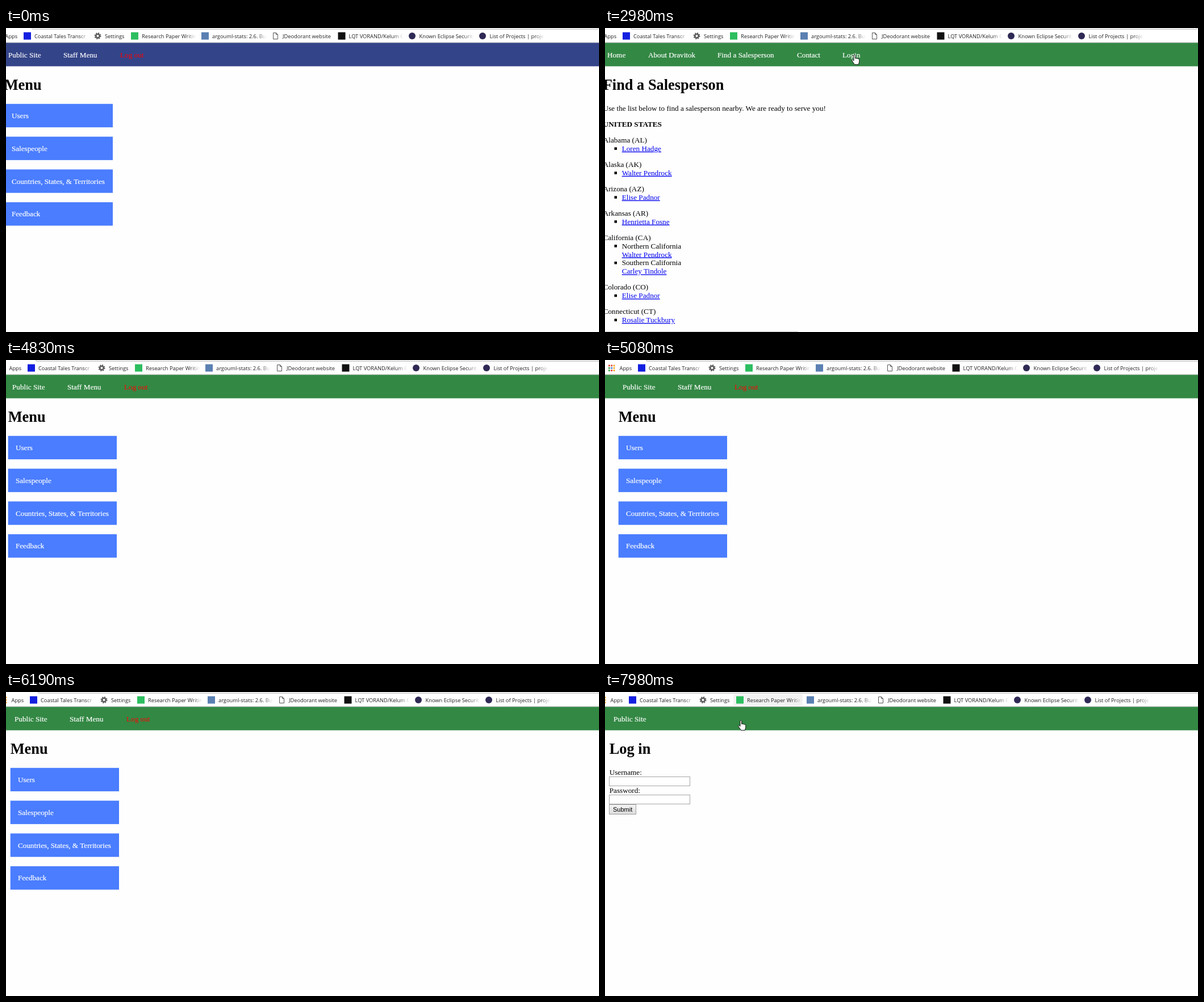
Write an HTML page that moves like this. It is 1044 by 536 pixels and loops after 8000 ms.

```html
<!DOCTYPE html>
<html lang="en">
<head>
<meta charset="utf-8">
<title>Staff menu</title>
<style>
  html, body { margin: 0; width: 100%; height: 100%; overflow: hidden; background: #fefefe; }
  svg { display: block; }
  text { font: 13.2px "Liberation Serif", "Times New Roman", serif; white-space: pre; }
  .h1 { font-size: 26.4px; font-weight: bold; }
  .b { font-weight: bold; }
  .w { fill: #fff; stroke: #fff; stroke-width: .2; }
  .red { fill: #f00; }
  .link { fill: #00e; text-decoration: underline; }
  .mark { font: 9.3px "Open Sans", sans-serif; fill: #222; }
  .fade { fill: url(#fade); }
  .btn { font: 11px "Liberation Sans", Arial, sans-serif; }
</style>
</head>
<body>
<svg id="stage" width="1044" height="536" viewBox="0 0 1044 536"></svg>
<script>
const text = (x, y, str, cls = '') =>
  `<text x="${x}" y="${y}" class="${cls}">${str.replace(/&/g, '&amp;')}</text>`;
const rect = (x, y, w, h, fill, more = '') =>
  `<rect x="${x}" y="${y}" width="${w}" height="${h}" fill="${fill}" ${more}/>`;
const group = (id, body) => `<g id="${id}">${body}</g>`;

// Bookmark bar
const square = color => x => rect(x, 7.5, 13, 13, color);
const disc = x => `<circle cx="${x + 6.5}" cy="14" r="6" fill="#2f2a55"/>`;
const gear = x => `<g fill="none" stroke="#5c5c5c" transform="translate(${x + 6.5} 14)">
  <circle r="3.3" stroke-width="2.6"/><circle r="5" stroke-width="2" stroke-dasharray="2 1.93"/></g>`;
const sheet = x => `<path d="M${x + 2.5} 8.5h5l3 3v8h-8zM${x + 7.5} 8.5v3h3" fill="#fff" stroke="#555"/>`;

const bookmarks = [
  [50, 'Coastal Tales Transcr', square('#1420e0')],
  [174, 'Settings', gear],
  [239, 'Research Paper Writing', square('#2dbe60')],
  [363, 'argouml-stats: 2.6. Build', square('#5b80b2')],
  [487, 'JDeodorant website', sheet],
  [603.5, 'LQT VORAND/Kelum Comp', square('#111')],
  [727.5, 'Known Eclipse Security', disc],
  [851.5, 'List of Projects | projects', disc]
];
const bookmark = ([x, label, icon]) => `<g transform="translate(${x})">${icon(-19)}` +
  text(0, 17.5, label, /^(Set|JDe)/.test(label) ? 'mark' : 'mark fade') + '</g>';

const dotColors = ['#e0402f', '#e0402f', '#f2a31b', '#3a9e4d', '#3f7de0', '#f2a31b', '#3a9e4d', '#e0402f', '#f2a31b'];
const dots = dotColors.map((c, i) => rect(-21 + i % 3 * 4.3, 8.5 + (i / 3 | 0) * 4.3, 2.8, 2.8, c)).join('');

const bar = rect(-60, -20, 1200, 45.3, '#fff') +
  '<path d="M45.5-6V0q0 2 2 2H1041q2 0 2-2V-6" fill="none" stroke="#aaa"/>' +
  group('hoverStats', rect(339, 4, 123, 20, '#e6e6e6', 'rx="2"')) +
  group('hoverPaper', rect(215, 4, 122, 20, '#f2f2f2', 'rx="2"')) +
  dots + text(-1.5, 17.5, 'Apps', 'mark') + bookmarks.map(bookmark).join('') +
  rect(-60, 25.3, 1200, .9, '#b6b4b6');

// Pages
const LEFT = -3.3, LINE = 14.87, GAP = 13.2;
const nav = items => items.map(([x, s, cls = 'w']) => text(x, 52, s, cls)).join('');
const title = s => text(LEFT, 109, s, 'h1');

const menu = nav([[4, 'Public Site'], [101, 'Staff Menu'], [201, 'Log out', 'red']]) + title('Menu') +
  ['Users', 'Salespeople', 'Countries, States, & Territories', 'Feedback'].map((s, i) =>
    rect(LEFT, 133.8 + 57.8 * i, 191.3, 41.3, '#4a7dff') + text(9.9, 159 + 57.8 * i, s, 'w')).join('');

const states = [
  ['Alabama (AL)', '*Loren Hadge'],
  ['Alaska (AK)', '*Walter Pendrock'],
  ['Arizona (AZ)', '*Elise Padnor'],
  ['Arkansas (AR)', '*Henrietta Fosne'],
  ['California (CA)', 'Northern California', '>Walter Pendrock', 'Southern California', '>Carley Tindole'],
  ['Colorado (CO)', '*Elise Padnor'],
  ['Connecticut (CT)', '*Rosalie Tuckbury']
];
function stateList() {
  let y = 202, out = '';
  for (const [state, ...rows] of states) {
    out += text(LEFT, y, state);
    for (const row of rows) {
      y += LINE;
      if (row[0] !== '>') out += rect(16.5, y - 6.5, 4.5, 4.5, '#000');
      out += text(29.7, y, row.replace(/^[*>]/, ''), /^[*>]/.test(row) ? 'link' : '');
    }
    y += LINE + GAP;
  }
  return out;
}
const find = nav([[4, 'Home'], [76, 'About Dravitok'], [198, 'Find a Salesperson'], [338, 'Contact'], [418, 'Login']]) +
  title('Find a Salesperson') +
  text(LEFT, 146, 'Use the list below to find a salesperson nearby. We are ready to serve you!') +
  text(LEFT, 173.7, 'UNITED STATES', 'b') + stateList();

const field = y => rect(-3.5, y, 142, 16, '#fff', 'stroke="#a6a6a6"');
const login = nav([[4, 'Public Site']]) + title('Log in') +
  text(LEFT, 146, 'Username:') + field(149.5) + text(LEFT, 178, 'Password:') + field(181.5) +
  rect(-3.5, 198.5, 47, 17, 'url(#face)', 'stroke="#a0a0a0"') + text(3, 211, 'Submit', 'btn');

const stage = document.getElementById('stage');
stage.innerHTML = `<defs>
  <linearGradient id="fade" gradientUnits="userSpaceOnUse" x1="78" y1="0" x2="96" y2="0">
    <stop stop-color="#222"/><stop offset="1" stop-color="#222" stop-opacity="0"/></linearGradient>
  <linearGradient id="face" x2="0" y2="1"><stop stop-color="#f4f4f4"/><stop offset="1" stop-color="#dcdcdc"/></linearGradient>
  </defs>` +
  group('view', bar + rect(-60, 26.2, 1200, 41.3, '#384', 'id="header"') +
    group('menu', menu) + group('find', find) + group('login', login)) +
  rect(0, 535, 340, 1, '#c8c8c8', 'id="status"') +
  `<g fill="#fff" stroke="#000" stroke-width=".9" stroke-linejoin="round">
    <path id="arrow" d="M.5.5V14L3.5 11.2 5.6 15.6 7.5 14.7 5.5 10.3H9.6Z"/>
    <path id="hand" d="M4 2q1.3-2 2.6 0V7.5q1.5-1.2 2.5.3 1.6-.8 2.3.5 2.1-.6 2.3 1.2V13.5L12.3 18.5H5.5L1 12Q-.2 9.8 1.8 9.6L4 11.5Z"/>
  </g>`;

// Tracks: each row holds from its start time until the next
const pages = [[0, 'menu', '#348'], [1340, 'find', '#384'], [3920, 'menu', '#384'], [7710, 'login', '#384']];
const pans = [[0, 0, 0], [4830, 7, 0], [4955, 18, 0], [5080, 27, 0], [5220, 28, 0], [5370, 24, 0],
  [5520, 19, 2.4], [5640, 16, 2], [5790, 13, 1], [5920, 11, -1], [6190, 11, 0]];
const pointer = [[0, ''], [2240, 'arrow', 547, 14], [2450, 'arrow', 512, 25], [2575, 'arrow', 462, 40],
  [2700, 'hand', 434, 45], [2850, 'hand', 434, 44], [2975, 'hand', 434, 46], [3100, 'hand', 434, 48],
  [3650, 'arrow', 418, 32], [3770, 'arrow', 401, 17], [3920, 'arrow', 399, -2], [4040, ''],
  [4310, 'arrow', 400, -10], [4440, ''], [6620, 'arrow', 275, 26], [6770, 'hand', 227, 46],
  [6890, 'hand', 234, 50], [7410, 'hand', 234, 49]];
const statuses = [[0, 0], [2850, 340], [4590, 0], [7130, 354], [7980, 0]];
const hovers = [[0, ''], [3920, 'hoverStats'], [4040, ''], [6620, 'hoverPaper']];

const $ = id => document.getElementById(id);
const at = (track, t) => track.findLast(row => row[0] <= t).slice(1);
const showOnly = (ids, chosen) => ids.forEach(id => { $(id).style.display = id === chosen ? '' : 'none'; });

function draw(t) {
  const [page, color] = at(pages, t);
  showOnly(['menu', 'find', 'login'], page);
  $('header').setAttribute('fill', color);
  $('view').setAttribute('transform', `translate(${at(pans, t)})`);
  showOnly(['hoverStats', 'hoverPaper'], at(hovers, t)[0]);
  $('status').setAttribute('width', at(statuses, t)[0]);
  const [kind, x, y] = at(pointer, t);
  showOnly(['arrow', 'hand'], kind);
  if (kind) $(kind).setAttribute('transform', `translate(${x} ${y})`);
}

const start = performance.now();
function tick() {
  draw((performance.now() - start) % 8000);
  requestAnimationFrame(tick);
}
tick();
</script>
</body>
</html>
```
